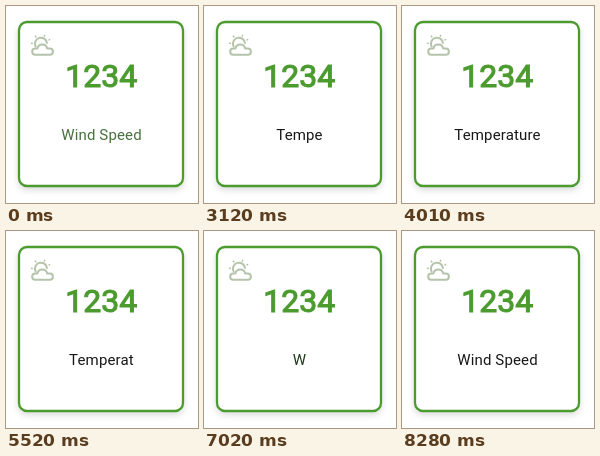
An HTML page for the animation above (9.53 s loop, 192 by 197 pixels).

```html
<!DOCTYPE html>
<html lang="en">
<head>
<meta charset="utf-8">
<title>Weather card</title>
<style>
html, body { margin: 0; height: 100%; overflow: hidden; background: #fff; }
svg { display: block; }
text { font-family: Roboto, sans-serif; text-anchor: middle; }
#value { font-size: 32px; fill: #4b9b2f; stroke: #4b9b2f; stroke-width: 1.1; }
#label { font-size: 15px; letter-spacing: .15px; }
.card { fill: #fff; stroke: #4b9b2f; stroke-width: 2.3; filter: drop-shadow(0 3px 3px #0002); }
.icon { fill: none; stroke: #b4c3aa; stroke-width: 2; stroke-linecap: round; stroke-linejoin: round; }
</style>
</head>
<body>
<svg width="192" height="197" viewBox="0 0 192 197">
  <rect class="card" x="13" y="16" width="164" height="164" rx="8"/>
  <g class="icon">
    <path d="M29.3 48.8H43.8A3.1 3.1 0 0 0 43.8 42.6H41.2A5 5 0 0 0 31.4 42.6H29.3A3.1 3.1 0 0 0 29.3 48.8Z"/>
    <path d="M29.6 40.4A6 6 0 1 1 40.9 37"/>
    <path stroke-width="1.6" d="M29.4 30.2l.4 .6M38.6 29.4l-.2 .6M25.5 37.3l.6 .1M43.6 33.6l-.5 .3"/>
  </g>
  <text id="value" x="95.3" y="81">1234</text>
  <text id="label" x="95.5" y="134"></text>
</svg>
<script>
const LOOP = 9530, OLD = 'Wind Speed', NEW = 'Temperature';
const value = document.getElementById('value');
const label = document.getElementById('label');

// [time, word, visible letters]
const keys = [[0, OLD, 10], [2120, NEW, 0], [2620, NEW, 1]];
const run = (word, start, count, first, step) => {
  for (let i = 0; i < count; i++) {
    keys.push([start + Math.floor(i * 12.5) * 10, word, first + i * step]);
  }
};
run(NEW, 2870, 3, 3, 1);
run(NEW, 3390, 6, 6, 1);
run(NEW, 5270, 3, 10, -1);
run(NEW, 5770, 4, 7, -1);
run(NEW, 6400, 3, 3, -1);
run(OLD, 6900, 3, 0, 1);
run(OLD, 7400, 1, 4, 1);
run(OLD, 7650, 4, 6, 1);
run(OLD, 8280, 1, 10, 1);

function draw(now) {
  const t = now % LOOP;
  const [start, word, count] = keys.findLast(key => key[0] <= t);
  label.textContent = word.slice(0, count);
  label.setAttribute('fill', start === 0 ? '#46703c' : word === OLD && count === 1 ? '#1d3a17' : '#181818');
  // an empty label lets the value sink to the middle
  value.setAttribute('y', count ? 81 : 92);
  requestAnimationFrame(draw);
}
draw(0);
</script>
</body>
</html>
```
